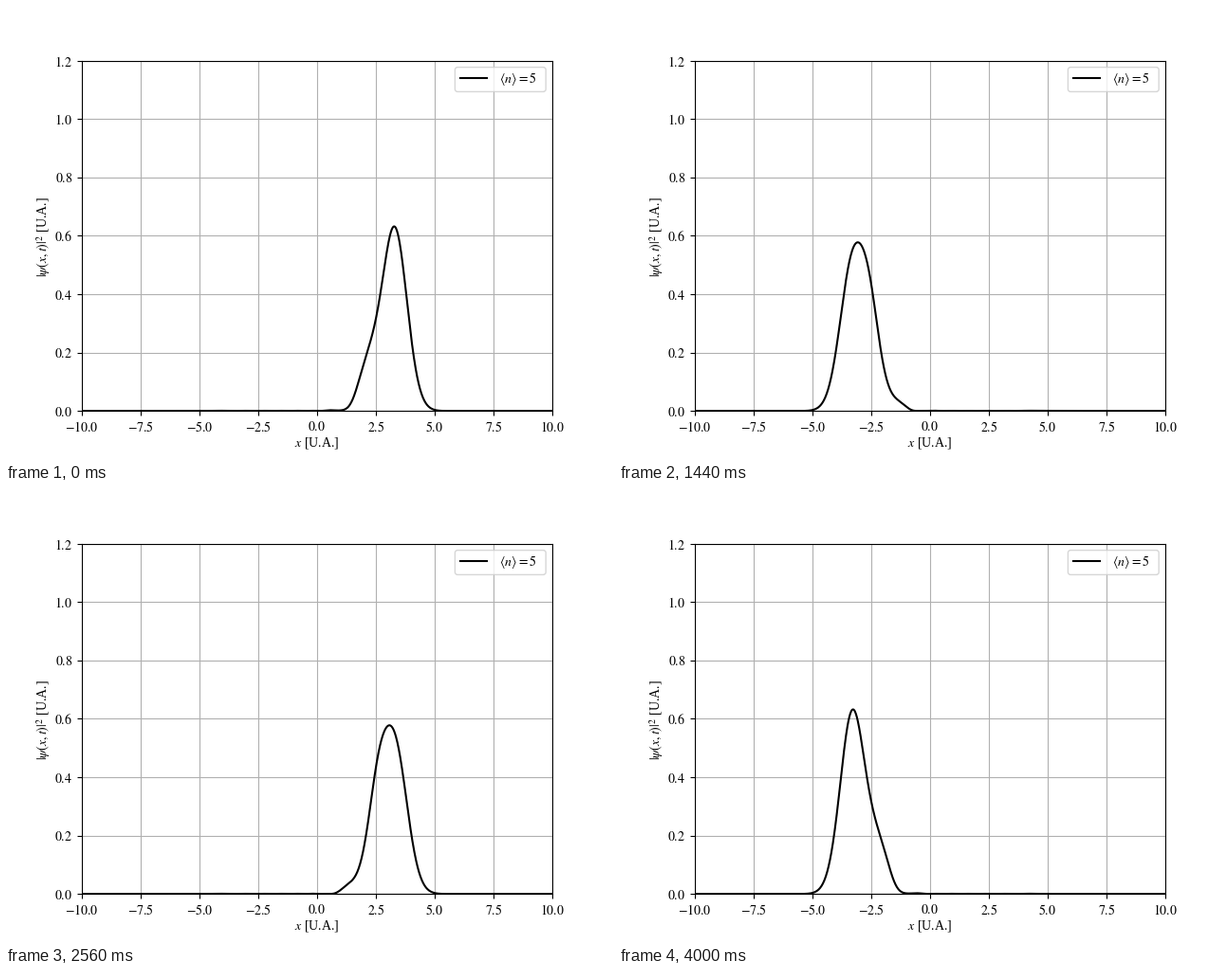
Recreate the animation shown at these times as a matplotlib script. Size 640 by 480 pixels, loop 4020 ms.

```python
import numpy as np
import matplotlib.pyplot as plt
from matplotlib.animation import FuncAnimation
from matplotlib.lines import Line2D
from matplotlib.patches import FancyBboxPatch
from matplotlib.transforms import Affine2D

W, H, DPI = 640, 480, 100
FRAMES, INTERVAL = 201, 20
MEAN_N, N_MAX = 5, 10
SWEEP = 3 * np.pi  # one and a half oscillations per loop

plt.rcParams.update({
    "font.family": "Liberation Serif",
    "mathtext.fontset": "stix",
    "font.size": 10,
})


def oscillator_states(x, n_max):
    """Harmonic oscillator eigenfunctions 0..n_max on the grid x."""
    states = [np.pi ** -0.25 * np.exp(-x ** 2 / 2)]
    states.append(np.sqrt(2) * x * states[0])
    for n in range(1, n_max):
        states.append(np.sqrt(2 / (n + 1)) * x * states[n]
                      - np.sqrt(n / (n + 1)) * states[n - 1])
    return np.array(states)


def coherent_weights(mean, n_max):
    """Amplitudes of a coherent state, cut off at n_max."""
    weights = [np.exp(-mean / 2)]
    for n in range(1, n_max + 1):
        weights.append(weights[-1] * np.sqrt(mean / n))
    return np.array(weights)


x = np.linspace(-10, 10, 1000)
levels = np.arange(N_MAX + 1)
weights = coherent_weights(MEAN_N, N_MAX)
terms = weights[:, None] * oscillator_states(x, N_MAX)


def density(phase):
    return np.abs(np.exp(-1j * levels * phase) @ terms) ** 2


fig, ax = plt.subplots(figsize=(W / DPI, H / DPI), dpi=DPI)
ax.set(xlim=(-10, 10), ylim=(0, 1.2),
       xticks=np.linspace(-10, 10, 9), yticks=np.linspace(0, 1.2, 7))
ax.grid(True)
for axis in (ax.xaxis, ax.yaxis):
    axis.set_major_formatter(lambda v, pos: f"${v:.1f}$")

# Labels and legend are placed in pixels from the top left corner.
px = Affine2D().scale(1 / W, -1 / H).translate(0, 1) + fig.transFigure


def label(cx, cy, text, rotation=0):
    fig.text(cx, cy, text, transform=px, ha="center", va="baseline",
             rotation=rotation, rotation_mode="anchor")


label(328, 464.8, r"$x$ [U.A.]")
label(44, 243.5, r"$|\psi(x,t)|^2$ [U.A.]", rotation=90)

fig.add_artist(FancyBboxPatch(
    (473.4, 64.6), 95.8, 25.8, boxstyle="round,pad=0,rounding_size=2.8",
    fc="white", ec="0.8", lw=1, alpha=0.8, transform=px))
fig.add_artist(Line2D([479, 506.8], [76, 76], color="black", lw=1.5,
                      transform=px))
label(540, 80.5, r"$\langle n\rangle = 5$")

curve, = ax.plot(x, density(0), color="black", lw=1.5)


def update(i):
    curve.set_ydata(density(SWEEP * i / (FRAMES - 1)))
    return curve,


anim = FuncAnimation(fig, update, frames=FRAMES, interval=INTERVAL,
                     repeat=True, repeat_delay=0)
plt.show()
```
